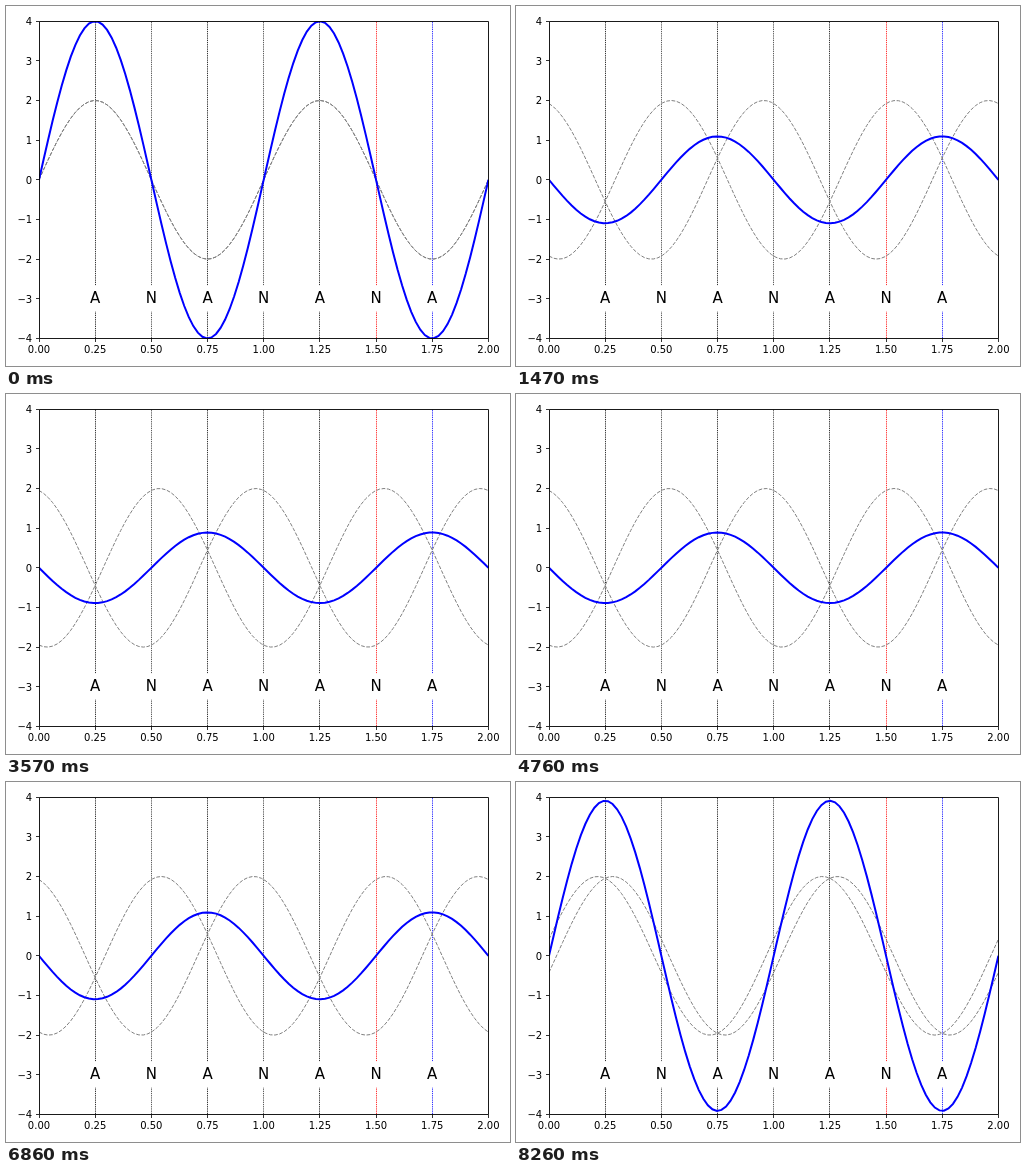
Write an HTML page with a canvas that moves like this. It is 504 px wide and 360 px high and loops after 8330 ms.

```html
<!DOCTYPE html>
<html>
<head>
<meta charset="utf-8">
<title>Standing wave</title>
<style>
html, body { margin: 0; width: 100%; height: 100%; overflow: hidden; background: #fff; }
canvas { display: block; }
</style>
</head>
<body>
<canvas id="stage" width="504" height="360"></canvas>
<script>
const ctx = document.getElementById('stage').getContext('2d');
const STEP = 70, STEPS = 119, CYCLES = 4, POINTS = 100;
const LEFT = 33, TOP = 15, WIDTH = 449, HEIGHT = 317;
const px = x => 33 + x * 224.7;
const py = y => 173.8 - y * 39.65;
const snap = v => Math.floor(v) + 0.5;

function stroke(color, width, dash = []) {
  ctx.strokeStyle = color;
  ctx.lineWidth = width;
  ctx.setLineDash(dash);
  ctx.stroke();
}

function segment(x1, y1, x2, y2, color, width, dash) {
  ctx.beginPath();
  ctx.moveTo(x1, y1);
  ctx.lineTo(x2, y2);
  stroke(color, width, dash);
}

function wave(amp, phase, color, width, dash) {
  ctx.beginPath();
  for (let i = 0; i < POINTS; i++) {
    const x = 2 * i / (POINTS - 1);
    ctx.lineTo(px(x), py(amp * Math.sin(2 * Math.PI * x + phase)));
  }
  stroke(color, width, dash);
}

function label(text, x, y, size, align) {
  ctx.font = size + 'px "DejaVu Sans", sans-serif';
  ctx.textAlign = align;
  ctx.fillStyle = '#000';
  ctx.fillText(text, x, y);
}

function drawMarkers() {
  for (let i = 1; i < 8; i++) {
    const x = snap(px(i / 4));
    const color = i === 6 ? '#f00' : i === 7 ? '#00f' : i % 2 ? '#000' : '#333';
    segment(x, 332, x, TOP, color, 0.8, [1.3, 0.9]);
  }
}

function drawLetters() {
  for (let i = 1; i < 8; i++) {
    const x = px(i / 4);
    ctx.fillStyle = '#fff';
    ctx.fillRect(x - 10, 279.5, 20, 26);
    label(i % 2 ? 'A' : 'N', x, 297, 15, 'center');
  }
}

function drawAxes() {
  ctx.beginPath();
  ctx.rect(LEFT + 0.5, TOP + 0.5, WIDTH, HEIGHT);
  stroke('#000', 0.9);
  for (let i = 0; i <= 8; i++) {
    const x = snap(px(i / 4)), y = snap(py(i - 4));
    segment(x, 332.5, x, 336, '#000', 0.8);
    segment(33.5, y, 30, y, '#000', 0.8);
    label((i / 4).toFixed(2), px(i / 4), 347, 10, 'center');
    label(String(i - 4).replace('-', '\u2212'), 26.2, Math.round(py(i - 4) + 3.9), 10, 'right');
  }
}

function draw(now) {
  const n = Math.floor(now / STEP) % STEPS;
  const phase = 2 * Math.PI * CYCLES * n / STEPS;
  ctx.fillStyle = '#fff';
  ctx.fillRect(0, 0, 504, 360);

  ctx.save();
  ctx.beginPath();
  ctx.rect(LEFT, TOP, WIDTH + 1, HEIGHT + 1);
  ctx.clip();
  drawMarkers();
  wave(2, -phase, '#808080', 1, [3.7, 1.6]);
  wave(2, phase, '#808080', 1, [3.7, 1.6]);
  wave(4 * Math.cos(phase), 0, '#00f', 2);
  ctx.restore();

  drawAxes();
  drawLetters();
}

const start = performance.now();
function tick() {
  draw(performance.now() - start);
  requestAnimationFrame(tick);
}
tick();
</script>
</body>
</html>
```
